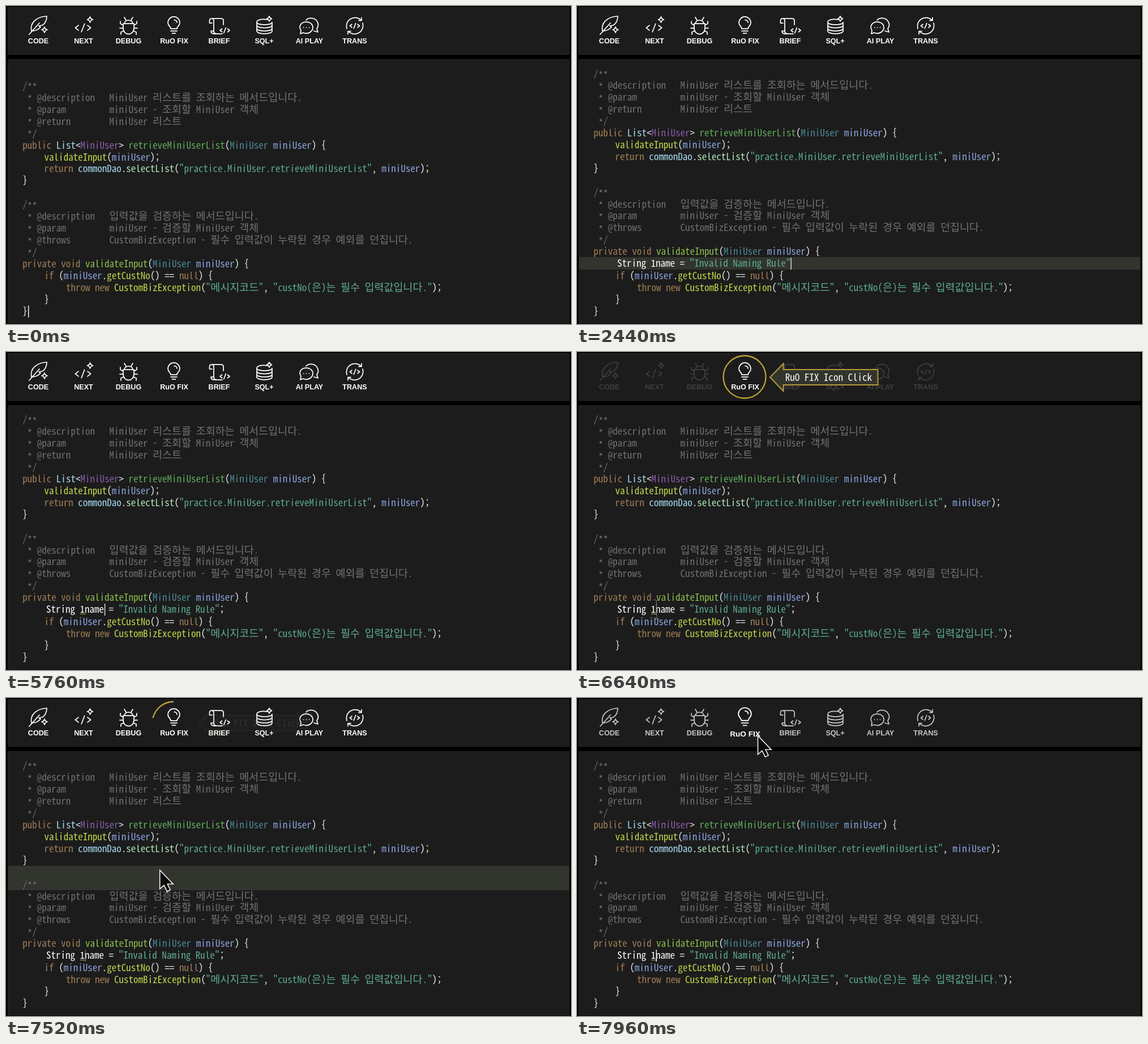
An HTML page that plays this animation: 998x561 px, repeating every 8 s.

```html
<!DOCTYPE html>
<html lang="ko">
<head>
<meta charset="utf-8">
<title>Code assistant</title>
<style>
  html, body { margin: 0; width: 100%; height: 100%; overflow: hidden; background: #000; }
  svg { display: block; width: 998px; height: 561px; }
  text { white-space: pre; }
  .code { font-family: "Noto Sans Mono CJK KR", "Noto Sans Mono", "Noto Sans CJK KR", monospace; }
  .label { font: bold 12.6px "Liberation Sans", Arial, sans-serif; text-anchor: middle; fill: #fff; }
  .panel { fill: #1c1c1c; stroke: #262626; }
  .line { fill: none; stroke: #fff; stroke-width: 1.75; stroke-linejoin: round; stroke-linecap: round; }
  .gold { fill: #33352d; stroke: #b39a3c; stroke-width: 2; }
</style>
</head>
<body>
<svg viewBox="0 0 998 561">
  <defs><clipPath id="typedClip"><rect id="typedArea" x="60" y="440" width="0" height="30"/></clipPath></defs>
  <rect class="panel" x="3.5" y="2.5" width="991" height="83"/>
  <rect class="panel" x="3.5" y="94.5" width="991" height="465"/>
  <rect id="lineBar" x="4" y="443" width="991" height="22" fill="#32342e"/>
  <rect id="hoverBar" x="4" width="991" height="43" fill="#32342e"/>
  <g id="upper"></g>
  <g id="lower"></g>
  <g id="typed" clip-path="url(#typedClip)"></g>
  <path id="underline" d="M131 462.300h10" stroke="#a9804a" stroke-width="1.400"/>
  <rect id="caret" width="1.500" height="21" fill="#f0f0f0"/>
  <g id="balloon">
    <path class="gold" d="M134 375.500H444Q454 375.500 454 385.500V403.500Q454 413.500 444 413.500H164L142 440L152 413.500H134Q124 413.500 124 403.500V385.500Q124 375.500 134 375.500Z"/>
    <path d="M150.500 382.500L162.500 404H138.500Z" fill="#d8ca3c" stroke="#d8ca3c" stroke-width="2" stroke-linejoin="round"/>
    <path d="M150.500 388.500v8M150.500 399.500v2.500" stroke="#111" stroke-width="2.600"/>
  </g>
  <g id="tools"></g>
  <g id="fixTool"></g>
  <path id="ring" d="M296 6.500a37.500 37.500 0 0 1 0 75a37.500 37.500 0 0 1 0 -75" pathLength="100" fill="none" stroke="#bba23a" stroke-width="2.300"/>
  <g id="arrow">
    <path class="gold" d="M341 44.500L364.500 20.500V31H531.500V58H364.500V69Z"/>
  </g>
  <path id="beam" d="M135.500 437q5 0 5 4q0-4 5-4M140.500 441V468M135.500 472q5 0 5-4q0 4 5 4" fill="none" stroke="#777" stroke-width="1.300"/>
  <path id="pointer" d="M0 0V33L7.500 26.500L13 37.500L18.500 34.700L13.500 24.500H23.500Z" fill="#080808" stroke="#f4f4f4" stroke-width="1.600"/>
</svg>
<script>
const NS = 'http://www.w3.org/2000/svg';
const LOOP = 8000, CELL = 8.51, LEFT = 29.3, TAB = CELL * 4.5, ROW = 20.93;
const $ = id => document.getElementById(id);

function add(parent, tag, attrs, content = '') {
  const node = document.createElementNS(NS, tag);
  for (const key in attrs) node.setAttribute(key, attrs[key]);
  node.textContent = content;
  return parent.appendChild(node);
}

// Font sizes at which a Latin letter fills one cell and a Hangul syllable two
const pen = document.createElement('canvas').getContext('2d');
pen.font = '100px "Noto Sans Mono CJK KR", "Noto Sans Mono", "Noto Sans CJK KR", monospace';
const sizeFor = (glyph, cells) => 100 * cells * CELL / pen.measureText(glyph).width;
const latinSize = sizeFor('0', 1), hangulSize = sizeFor('가', 2);

const COLORS = {
  c: '#707371', k: '#a27d55', w: '#f0f0f0', l: '#a6dcf0', u: '#8a5ea8', g: '#5fae5c',
  p: '#4d8a96', v: '#8ca6e2', y: '#c2d84c', s: '#5dac94', m: '#b2e8be', d: '#8cc04c', W: '#fff'
};

// Parts alternate colour key and text; asterisks sit at mid height
function row(parent, x, y, ...parts) {
  const text = add(parent, 'text', { class: 'code' });
  for (let i = 0; i < parts.length; i += 2) {
    for (const run of parts[i + 1].split(/([가-힣]+|\*+)/)) {
      if (!run) continue;
      const hangul = /[가-힣]/.test(run);
      add(text, 'tspan', {
        x, y: run[0] === '*' ? y + 2.5 : y,
        fill: COLORS[parts[i]], 'font-size': hangul ? hangulSize : latinSize
      }, run);
      x += run.length * CELL * (hangul ? 2 : 1);
    }
  }
}

const note = (tag, body) => [0, 'c', ' * ' + tag.padEnd(15) + body];
const upperRows = [
  [0, 'c', '/**'],
  note('@description', 'MiniUser 리스트를 조회하는 메서드입니다.'),
  note('@param', 'miniUser - 조회할 MiniUser 객체'),
  note('@return', 'MiniUser 리스트'),
  [0, 'c', ' */'],
  [0, 'k', 'public ', 'l', 'List', 'w', '<', 'u', 'MiniUser', 'w', '> ', 'g', 'retrieveMiniUserList',
    'w', '(', 'p', 'MiniUser ', 'v', 'miniUser', 'w', ') {'],
  [1, 'y', 'validateInput', 'w', '(', 'v', 'miniUser', 'w', ');'],
  [1, 'k', 'return ', 'l', 'commonDao', 'w', '.', 'm', 'selectList', 'w', '(',
    's', '"practice.MiniUser.retrieveMiniUserList"', 'w', ', ', 'v', 'miniUser', 'w', ');'],
  [0, 'w', '}'],
  [0],
  [0, 'c', '/**'],
  note('@description', '입력값을 검증하는 메서드입니다.'),
  note('@param', 'miniUser - 검증할 MiniUser 객체'),
  note('@throws', 'CustomBizException - 필수 입력값이 누락된 경우 예외를 던집니다.'),
  [0, 'c', ' */'],
  [0, 'k', 'private void ', 'd', 'validateInput', 'w', '(', 'p', 'MiniUser ', 'v', 'miniUser', 'w', ') {']
];
const lowerRows = [
  [1, 'k', 'if ', 'w', '(', 'v', 'miniUser', 'w', '.', 'y', 'getCustNo', 'w', '() == ', 'k', 'null', 'w', ') {'],
  [2, 'k', 'throw new ', 'y', 'CustomBizException', 'w', '(', 's', '"메시지코드"', 'w', ', ',
    's', '"custNo(은)는 필수 입력값입니다."', 'w', ');'],
  [1, 'w', '}'],
  [0, 'w', '}']
];
const fill = (id, rows, top) => rows.forEach(([tabs, ...parts], i) =>
  row($(id), LEFT + tabs * TAB, top + i * ROW, ...parts));
fill('upper', upperRows, 125.3);
fill('lower', lowerRows, 482);

const TYPE_X = LEFT + CELL * 4.9;
row($('typed'), TYPE_X, 460.3, 'W', 'String 1name = ', 's', '"Invalid Naming Rule"', 'W', ';');
row($('balloon'), 169.5, 400, 'W', '변수명은 숫자로 시작할 수 없음!');
row($('arrow'), 367.8, 50.5, 'W', 'RuO FIX Icon Click');

const star = (x, y, r) =>
  `M${x} ${y - r}Q${x + 1} ${y - 1} ${x + r} ${y}Q${x + 1} ${y + 1} ${x} ${y + r}` +
  `Q${x - 1} ${y + 1} ${x - r} ${y}Q${x - 1} ${y - 1} ${x} ${y - r}Z`;
const brackets = (x, y, s) =>
  `M${x - s} ${y - s * .55}l${-s * .7} ${s * .55}l${s * .7} ${s * .55}` +
  `M${x + s} ${y - s * .55}l${s * .7} ${s * .55}l${-s * .7} ${s * .55}` +
  `M${x + s * .35} ${y - s * .9}L${x - s * .35} ${y + s * .9}`;

const tools = [
  [57, 'CODE', 'M41 50L59 30M45 44C42 30 53 19 72 18C72 26 69 31 64 34L58 35L61 37C57 42 51 44 45 44' + star(68, 42, 5)],
  [137, 'NEXT', brackets(136, 38.5, 8) + star(148.5, 24, 5)],
  [216.5, 'DEBUG', 'M207 31H226V39C226 53 207 53 207 39ZM209 31C210 23 223 23 224 31M212 25L209 20M221 25L224 20' +
    'M207 34L202 31V27M226 34L231 31V27M207 39H201M226 39H232M208 44L203 46V50M225 44L230 46V50'],
  [297, 'RuO FIX', 'M291 40C291 36 286 35 286 29.5A10.5 10.5 0 0 1 307 29.5C307 35 302 36 302 40ZM291 44H302M293.500 48H299.500M297 24.500C300 24.500 302 26.500 302 29'],
  [376.5, 'BRIEF', 'M364 30H359.500V26Q359.500 22 363 22H380Q384 22 384 26V33M363 22Q367 22 367 26V44Q367 49 372 49H382M367 44H362Q362 49 368 49H372' + brackets(386.5, 43, 5)],
  [456, 'SQL+', 'M461 24C451 22 443 25 443 28.500C443 34.500 470 34.500 470 28.500M443 28.500V44C443 50.500 470 50.500 470 44V28.500M443 34C443 40 470 40 470 34M443 39.500C443 45.500 470 45.500 470 39.500' + star(465, 22.500, 4.500)],
  [536, 'AI PLAY', 'M520 49L521 43C516 35 522 28 530 28C538 28 542 33 542 38C542 45 533 51 525 47ZM530 25C534 20 543 20 548 25C553 31 552 36 549 40L551 46L544 44' +
    'M525.500 38h.1M530.500 38h.1M535.500 38h.1'],
  [616, 'TRANS', 'M602 40A15 15 0 0 1 627 25M623 25.500H628V20.500M630 30A15 15 0 0 1 605 45M609 44.500H604V49.500' + brackets(616, 35, 5)]
];
for (const [x, name, path] of tools) {
  const group = name.endsWith('FIX') ? $('fixTool') : $('tools');
  add(group, 'path', { class: 'line', d: path });
  add(group, 'text', { class: 'label', x, y: 66.3 }, name);
}

// Linear interpolation through [time, value] steps
function track(t, steps) {
  if (t <= steps[0][0]) return steps[0][1];
  for (let i = 1; i < steps.length; i++) {
    const [t0, a] = steps[i - 1], [t1, b] = steps[i];
    if (t < t1) return a + (b - a) * (t - t0) / (t1 - t0);
  }
  return steps[steps.length - 1][1];
}
const ramp = (t, from, to) => track(t, [[from, 0], [to, 1]]);
const smooth = p => p * p * (3 - 2 * p);
const set = (id, key, value) => $(id).setAttribute(key, value);
const fade = (id, value) => set(id, 'opacity', value);

const typedSteps = [[840, 0], [880, 1], [1720, 23], [2360, 36], [2460, 36], [2520, 37]];
const caretSteps = [[4770, 385.2], [5080, 318.5], [5760, 174], [5920, 147.5], [5960, 139.5]];

function drawCaret(t, count) {
  const start = t < 320;
  const x = start ? 39 : t < 4770 ? TYPE_X + count * CELL : track(t, caretSteps);
  const moving = (t > 840 && t < 2560) || (t > 4770 && t < 5960);
  const blink = .65 + .35 * Math.cos((t - 4160) / 950 * 2 * Math.PI);
  set('caret', 'x', x);
  set('caret', 'y', start ? 528.5 : 444);
  fade('caret', start ? 1 - ramp(t, 80, 240) : t < 840 ? ramp(t, 560, 680) : moving ? .9 : blink);
}

function drawPointer(t) {
  const x = track(t, [[7120, 142], [7300, 200], [7520, 271.5], [7700, 306], [7860, 319], [7960, 319.5]]);
  const y = track(t, [[7120, 455], [7300, 404], [7520, 304.5], [7700, 180], [7860, 76], [7960, 66.5]]);
  set('pointer', 'transform', `translate(${x} ${y})`);
  fade('pointer', ramp(t, 7080, 7160));
  const top = 443 - 21 * Math.ceil((443 - y) / 21);
  set('hoverBar', 'y', Math.min(top, 422));
  fade('hoverBar', t > 7160 && y > 112 ? 1 : 0);
}

function render(t) {
  set('upper', 'transform', `translate(0 ${21.7 * (1 - smooth(ramp(t, 200, 640)))})`);
  fade('lineBar', ramp(t, 480, 680) - ramp(t, 2480, 2560));
  const count = Math.floor(track(t, typedSteps) + 1e-6);
  set('typedArea', 'width', count ? TYPE_X - 60 + count * CELL : 0);
  drawCaret(t, count);

  fade('underline', ramp(t, 2600, 2800));
  fade('balloon', ramp(t, 2600, 3040) - ramp(t, 4300, 4740));

  fade('tools', track(t, [[5960, 1], [6240, .15], [7140, .15], [7460, 1], [7760, 1], [7920, .75]]));
  const grow = 1 + .08 * smooth(ramp(t, 7780, 7920));
  set('fixTool', 'transform', `translate(297 43) scale(${grow}) translate(-297 -43)`);

  const drawn = 100 * ramp(t, 6000, 6500), erased = 100 * ramp(t, 7080, 7640);
  set('ring', 'stroke-dasharray', `0 ${erased} ${drawn - erased} 200`);
  fade('ring', drawn > erased ? 1 : 0);

  const slide = ramp(t, 6120, 6560);
  set('arrow', 'transform', `translate(${227 * (1 - slide) ** 2} 0)`);
  fade('arrow', slide - ramp(t, 7140, 7555));

  fade('beam', .8 * (ramp(t, 6540, 6660) - ramp(t, 7060, 7140)));
  drawPointer(t);
}

const begin = performance.now();
function tick() {
  render((performance.now() - begin) % LOOP);
  requestAnimationFrame(tick);
}
tick();
</script>
</body>
</html>
```
